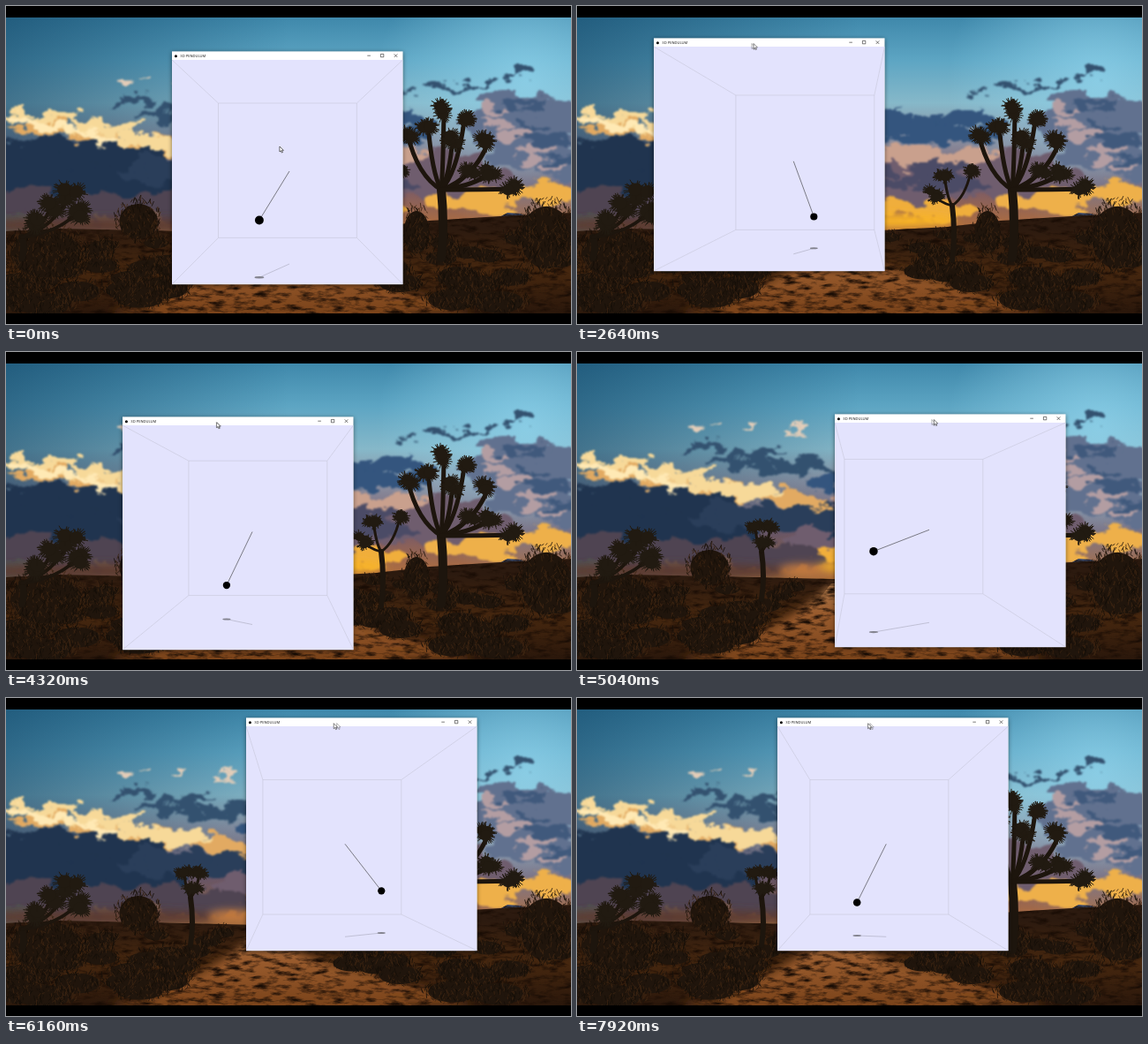
Recreate the animation shown at these times as an HTML page. Size 640 by 360 pixels, loop 8 s.

```html
<!DOCTYPE html>
<html lang="en">
<head>
<meta charset="utf-8">
<title>3D Pendulum</title>
<style>
  html, body { margin: 0; width: 100%; height: 100%; overflow: hidden; background: #000; }
  svg.stage { position: absolute; left: 0; top: 0; width: 640px; height: 360px; display: block; }
  #scenery { will-change: transform; }
  #title { font: 4.1px "Open Sans", "Noto Sans", sans-serif; fill: #111; }
  .thin { fill: none; stroke-width: .6; }
</style>
</head>
<body>
<svg id="scenery" class="stage" viewBox="0 0 640 360">
  <defs>
    <linearGradient id="sky" x1="0" y1="13" x2="0" y2="255" gradientUnits="userSpaceOnUse">
      <stop offset="0" stop-color="#3f88ab"/>
      <stop offset=".2" stop-color="#5da5c3"/>
      <stop offset=".4" stop-color="#86b8c9"/>
      <stop offset=".55" stop-color="#8c93a4"/>
      <stop offset=".78" stop-color="#75596a"/>
      <stop offset="1" stop-color="#b5703a"/>
    </linearGradient>
    <linearGradient id="shade" x1="0" x2="1">
      <stop offset="0" stop-color="#0b3a5a" stop-opacity=".55"/>
      <stop offset=".5" stop-color="#0b3a5a" stop-opacity="0"/>
    </linearGradient>
    <radialGradient id="glare" cx="590" cy="85" r="170" gradientUnits="userSpaceOnUse">
      <stop offset="0" stop-color="#92d6ee" stop-opacity=".75"/>
      <stop offset="1" stop-color="#92d6ee" stop-opacity="0"/>
    </radialGradient>
    <linearGradient id="soil" x1="0" y1="252" x2="0" y2="348" gradientUnits="userSpaceOnUse">
      <stop offset="0" stop-color="#2c1a0f"/>
      <stop offset=".5" stop-color="#46270f"/>
      <stop offset="1" stop-color="#2a170b"/>
    </linearGradient>
    <linearGradient id="road" x1="0" y1="260" x2="0" y2="348" gradientUnits="userSpaceOnUse">
      <stop offset="0" stop-color="#a8764a"/>
      <stop offset=".4" stop-color="#9a5c2e"/>
      <stop offset="1" stop-color="#7a431a"/>
    </linearGradient>
    <filter id="fluff" x="-10%" y="-10%" width="120%" height="120%" color-interpolation-filters="sRGB">
      <feTurbulence type="fractalNoise" baseFrequency=".04 .07" numOctaves="5" seed="8"/>
      <feDisplacementMap in="SourceGraphic" scale="32" xChannelSelector="R" yChannelSelector="G"/>
      <feGaussianBlur stdDeviation=".9"/>
    </filter>
    <filter id="grain" x="0" y="0" width="100%" height="100%" color-interpolation-filters="sRGB">
      <feTurbulence type="fractalNoise" baseFrequency=".06 .2" numOctaves="4" seed="3"/>
      <feColorMatrix values="0 0 0 0 .1  0 0 0 0 .05  0 0 0 0 .02  2.6 0 0 0 -1.15"/>
      <feComposite in2="SourceAlpha" operator="in" result="dust"/>
      <feMerge><feMergeNode in="SourceGraphic"/><feMergeNode in="dust"/></feMerge>
    </filter>
    <filter id="soft" x="-20%" y="-50%" width="140%" height="200%"><feGaussianBlur stdDeviation="5"/></filter>
    <clipPath id="photo"><rect y="13" width="640" height="335"/></clipPath>
  </defs>
  <g id="land" clip-path="url(#photo)"></g>
</svg>

<svg class="stage" viewBox="0 0 640 360">
  <defs>
    <filter id="drop" x="-10%" y="-10%" width="120%" height="120%"><feGaussianBlur stdDeviation="2.5"/></filter>
    <path id="arrow" d="M0 0V6L1.4 4.8 2.4 7 3.4 6.6 2.4 4.4H4.3Z" fill="#fff" stroke="#222" stroke-width=".55"/>
  </defs>
  <g id="win">
    <rect y="1.5" width="261.5" height="264" opacity=".5" filter="url(#drop)"/>
    <rect y=".4" width="261.5" height="263.8" fill="#fff"/>
    <circle cx="4.4" cy="5.8" r="1.5"/>
    <text id="title" x="9.3" y="6.7">3D PENDULUM</text>
    <path class="thin" stroke="#222" d="M221.3 5.2h3.6M236.4 3.4h3.4v3.4h-3.4zM251.7 3.4l3.6 3.6M255.3 3.4l-3.6 3.6"/>
  </g>
  <svg id="room" width="261.5" height="254">
    <rect id="wall" width="261.5" height="254" fill="#e3e3fd"/>
    <path id="edges" class="thin" stroke="#c6c6d8"/>
    <path id="shadeLine" class="thin" stroke="#a8a8ba"/>
    <ellipse id="shadeBob" fill="#84848f"/>
    <path id="rod" class="thin" stroke="#333"/>
    <circle id="bob"/>
  </svg>
  <use id="trail" href="#arrow" opacity=".6"/>
  <use id="cursor" href="#arrow"/>
</svg>

<script>
const $ = id => document.getElementById(id);
const set = (id, attrs) => { for (const k in attrs) $(id).setAttribute(k, attrs[k]); };
const mix = (a, b, u) => a + (b - a) * u;

// ---- scenery ----
let seed = 11;
const rnd = () => (seed = (seed * 16807) % 2147483647) / 2147483647;
const spread = r => (rnd() * 2 - 1) * r;
const repeat = (n, make) => Array.from({ length: n }, (_, i) => make(i)).join('');
const n1 = v => v.toFixed(1);

const oval = (x, y, rx, ry, color) =>
  `<ellipse cx="${n1(x)}" cy="${n1(y)}" rx="${n1(rx)}" ry="${n1(ry)}" fill="${color}"/>`;
const strokes = (d, color, width) =>
  `<path d="${d}" fill="none" stroke="${color}" stroke-width="${width}" stroke-linecap="round"/>`;

// n flat puffs strewn along a line
const streak = (color, n, [x0, y0], [x1, y1], jitter, size) => repeat(n, i => {
  const u = (i + rnd()) / n, r = size * (.6 + rnd() * .8);
  return oval(mix(x0, x1, u), mix(y0, y1, u) + spread(jitter), r, r * .32, color);
});

const clouds = () => '<g filter="url(#fluff)">' +
  streak('#61718f', 44, [545, 142], [640, 150], 38, 24) +
  streak('#b39da2', 12, [545, 122], [620, 180], 15, 15) +
  streak('#40597c', 12, [575, 112], [640, 175], 18, 15) +
  streak('#6f5d6e', 34, [260, 198], [540, 195], 20, 36) +
  streak('#34557e', 26, [280, 142], [470, 138], 13, 23) +
  streak('#c9a08d', 12, [285, 166], [460, 174], 6, 18) +
  streak('#4b4b66', 14, [270, 188], [440, 192], 12, 20) +
  streak('#20344f', 46, [-10, 178], [180, 196], 32, 34) +
  streak('#2a3e5a', 18, [150, 182], [290, 190], 12, 24) +
  streak('#33516f', 18, [125, 110], [290, 135], 12, 14) +
  streak('#33516f', 8, [455, 98], [590, 78], 3, 11) +
  streak('#e2aa62', 16, [0, 136], [290, 172], 8, 17) +
  streak('#f7d999', 20, [0, 124], [230, 160], 9, 15) +
  streak('#ffe9b4', 9, [10, 126], [120, 150], 5, 11) +
  streak('#e4cdb8', 4, [118, 84], [255, 86], 2, 8) +
  streak('#f0ae3c', 16, [280, 228], [440, 234], 4, 26) +
  streak('#eeb04a', 18, [490, 224], [640, 208], 6, 24) +
  streak('#4f4452', 18, [0, 226], [250, 230], 5, 32) + '</g>' +
  '<g filter="url(#soft)">' + oval(350, 243, 80, 8, '#f8b328') + oval(110, 248, 150, 8, '#5b3a30') +
  oval(255, 246, 25, 6, '#c77b3c') + '</g>';

// spiky ball of leaves
const tuft = (x, y, r) => oval(x, y, r * .6, r * .55, '#211a11') + strokes(repeat(r * 4, () => {
  const a = rnd() * 7, len = r * (.65 + rnd() * .4);
  return `M${n1(x)} ${n1(y)}l${n1(len * Math.cos(a))} ${n1(len * .9 * Math.sin(a))}`;
}), '#211a11', 1);

// trunk with limbs bending out to leafy tips
const tree = (x, base, fork, width, leaf, tips) =>
  strokes(`M${x} ${base}Q${x + 4} ${mix(base, fork, .5)} ${x} ${fork}`, '#1d150d', width) +
  tips.map(([tx, ty]) =>
    strokes(`M${x} ${fork}Q${mix(x, tx, .7)} ${mix(fork, ty, .25)} ${tx} ${ty}`, '#1d150d', width * .5) +
    repeat(3, () => tuft(tx + spread(leaf * .6), ty + spread(leaf * .5), leaf))).join('');

const trees = () =>
  tree(493, 285, 208, 10, 11, [[455, 146], [478, 134], [496, 118], [519, 130], [506, 150], [546, 155], [524, 186], [548, 189], [574, 207]]) +
  tree(425, 288, 226, 6, 9, [[404, 213], [416, 189], [446, 188]]) +
  tree(209, 280, 226, 6, 9, [[202, 200], [219, 199], [211, 212]]) +
  tree(18, 285, 262, 8, 13, [[72, 213], [50, 229], [78, 236], [36, 246]]);

const bush = (x, y, rx, ry) => oval(x, y, rx * .8, ry * .8, '#20150c') +
  ['#20150c', '#3d2512', '#150e08'].map(color => strokes(repeat(rx * ry / 9, () => {
    const a = rnd() * 7, k = Math.sqrt(rnd());
    return `M${n1(x + rx * k * Math.cos(a))} ${n1(y + ry * k * Math.sin(a))}l${n1(spread(3))} ${n1(-1 - rnd() * 5)}`;
  }), color, .8)).join('');

// scrub gets larger towards the viewer and keeps off the road
const scrub = () => repeat(60, i => {
  const near = i / 60, side = rnd() < .5 ? -1 : 1;
  const x = 292 + side * (16 + 110 * near + rnd() * 300), size = 9 + 14 * near;
  return bush(x, 259 + 80 * near, size * 1.6, size * .7);
});

const ground = () => '<g filter="url(#grain)">' +
  '<path d="M552 243L568 234 582 235 600 243Z" fill="#3c4a6b"/>' +
  '<path d="M0 255L60 252 200 255 290 257 420 250 480 243 560 238 640 234V348H0Z" fill="url(#soil)"/>' +
  '<path d="M286 264H297Q325 296 420 312L530 348H115Q240 315 286 264Z" fill="url(#road)" filter="url(#soft)"/>' +
  '<path d="M288 262H296Q318 300 400 318L460 348H160Q250 315 288 262Z" fill="url(#road)"/></g>' +
  scrub() + bush(150, 244, 27, 25) + bush(45, 280, 50, 34) + bush(612, 262, 36, 44) + bush(465, 256, 18, 30);

$('land').innerHTML =
  ['sky', 'shade', 'glare'].map(id => `<rect y="13" width="640" height="250" fill="url(#${id})"/>`).join('') +
  clouds() + ground() + trees();

// ---- motion ----
const LOOP = 8000, STEP = 80;
const VX = 319.25, VY = 183.5;          // vanishing point
const W = 261.5, H = 264, BAR = 10, DEPTH = 265, ROD = 100, FLOOR = 140;

// time, left, top: the turns of the drag
const drag = [
  [0, 188, 51], [1840, 188, 51], [2480, 64, 36], [2800, 110, 36], [3520, 11, 27], [4320, 132, 73],
  [4560, 90, 74], [4920, 286, 70], [5040, 292, 70], [5200, 340, 70], [5480, 253, 68], [5800, 375, 36],
  [6160, 272, 22], [6740, 60, 56], [6960, 128, 44], [7240, 131, 73], [7680, 254, 40], [7920, 227, 22], [8080, 190, 26]
];
// time, then the rod's direction
const poses = [
  [0, -40, 64, -65], [1840, 72.6, 68.6, -4.5], [3520, 12, 91.4, 38], [5040, -86, 28, -43],
  [6160, 62, 72.7, 27.5], [6960, 51, -80, -32.5], [7920, -44.4, 89.9, 8]
];

function segment(keys, t) {
  let k = 0;
  while (k < keys.length - 2 && t >= keys[k + 1][0]) k++;
  const a = keys[k], b = keys[k + 1];
  return { k, a, b, u: Math.min(1, (t - a[0]) / (b[0] - a[0])) };
}

function tangent(keys, k, i) {
  if (k < 1 || k > keys.length - 2) return 0;
  const slope = (a, b) => (b[i] - a[i]) / (b[0] - a[0]);
  const p = slope(keys[k - 1], keys[k]), q = slope(keys[k], keys[k + 1]);
  return p * q > 0 ? 2 * p * q / (p + q) : 0;
}

// smooth path that turns only at its keys
function windowAt(t) {
  const { k, a, b, u } = segment(drag, t), v = 1 - u, h = b[0] - a[0];
  return [1, 2].map(i => v * v * (1 + 2 * u) * a[i] + u * u * (3 - 2 * u) * b[i] +
    h * u * v * (v * tangent(drag, k, i) - u * tangent(drag, k + 1, i)));
}

// one full swing between poses, dipping through the bottom
function rodAt(t) {
  const { a, b, u } = segment(poses, t);
  const dip = Math.sin(Math.PI * u), swing = Math.sin(2 * Math.PI * u) * Math.sign(b[1]);
  const dir = [mix(a[1], b[1], u) - 60 * swing, mix(a[2], b[2], u) + 40 * dip, mix(a[3], b[3], u) + 35 * dip];
  const k = ROD / Math.hypot(...dir);
  return dir.map(v => v * k);
}

function mouseAt(t, lead) {
  if (t < 1840) {
    const u = Math.max(0, Math.min(1, (t - 880) / 720)), e = u * u * (3 - 2 * u);
    return [mix(310, 295.5, e), mix(159, 57.5, e)];
  }
  const [x, y] = windowAt(t + lead);
  return [x + 107.7, y + 6.5];
}

function project(x, y, z) {
  const s = 1 / (1 + z * 2 / 3 / DEPTH);
  return [VX + (x - VX) * s, VY + (y - VY) * s, s];
}

const line = (a, b) => `M${a[0]} ${a[1]}L${b[0]} ${b[1]}`;

function draw(t) {
  const [x, y] = windowAt(t).map(Math.round), top = y + BAR;
  set('win', { transform: `translate(${x} ${y})` });
  set('room', { x, y: top, viewBox: `${x} ${top} ${W} ${H - BAR}` });
  set('wall', { x, y: top });

  const corners = [[x, top], [x + W, top], [x + W, y + H], [x, y + H]];
  const back = corners.map(c => project(...c, DEPTH));
  set('edges', { d: corners.map((c, i) => line(c, back[i]) + line(back[i], back[(i + 1) % 4])).join('') });

  const [dx, dy, dz] = rodAt(t);
  const px = x + 133.6, py = y + 137.2, pz = DEPTH / 2;
  const pin = project(px, py, pz), bob = project(px + dx, py + dy, pz + dz);
  const pinShade = project(px, py + FLOOR, pz), bobShade = project(px + dx, py + FLOOR, pz + dz);
  set('rod', { d: line(pin, bob) });
  set('bob', { cx: bob[0], cy: bob[1], r: 5.8 * bob[2] });
  set('shadeLine', { d: line(pinShade, bobShade) });
  set('shadeBob', { cx: bobShade[0], cy: bobShade[1], rx: 6.4 * bob[2], ry: 1.4 * bob[2] });

  const place = (id, [px, py]) => set(id, { x: px, y: py });
  place('cursor', mouseAt(t, 25));
  place('trail', mouseAt(t, 15));
}

function tick(now) {
  draw(Math.floor(now % LOOP / STEP) * STEP);
  requestAnimationFrame(tick);
}
draw(0);
requestAnimationFrame(tick);
</script>
</body>
</html>
```
